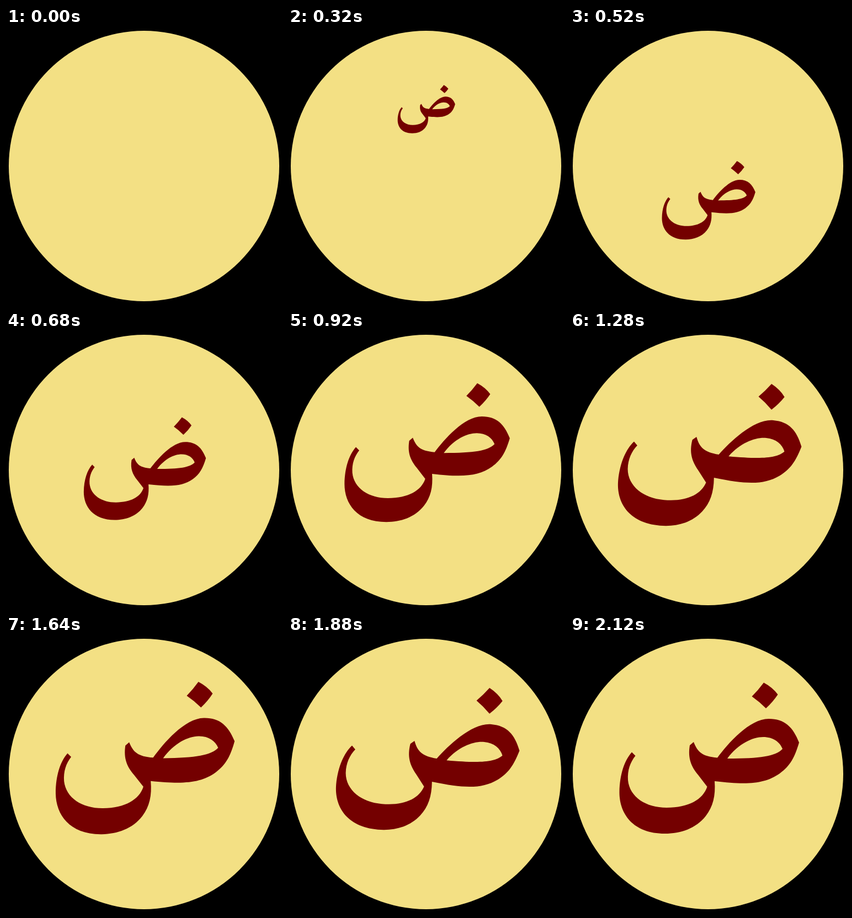
Animation, 500 px wide and 500 px high, one loop 2.8 s. Source, as an HTML page:

```html
<!DOCTYPE html>
<html lang="ar">
<head>
<meta charset="utf-8">
<title>Letter Dad</title>
<style>
html, body { margin: 0; width: 100%; height: 100%; overflow: hidden; background: #000; }
svg { display: block; width: 100%; height: 100%; }
</style>
</head>
<body>
<svg viewBox="0 0 500 500" role="img" aria-label="ض">
  <circle cx="250" cy="250" r="245" fill="#f3e084"/>
  <path id="letter" fill="#740000" fill-rule="evenodd" visibility="hidden" d="
    M351 84.5 Q367 93 376.5 106 Q368 119 355 131 Q343 119 329.5 109.5 Q341 98 351 84.5 Z
    M112 210.5 L118.5 217 C109 229 104 243 105 261 C108 292 138 311 175 311
    C215 311 241 296 248.5 273 L232 251.5 C220 237 213 222 217 198 L224 192
    C231 210 239 218 267 220.5 C286 195 325 150 360 150 C389 150 404 165 415 193
    C407 220 399 235 380 249 C353 268 322 270 262 263
    C264 290 259 309 246 326 C228 349 200 358 172 358
    C114 358 89.5 322 89.5 283 C90 250 99 225 112 210.5 Z
    M285 222 C305 195 331 183 350 183 C368 183 380 192 385 204.500 C372 218 345 222 285 222 Z"/>
</svg>
<script>
const LOOP = 2800, STEP = 40;
const letter = document.getElementById('letter');

const easeIn = u => u * u;
const sine = u => (1 - Math.cos(Math.PI * u)) / 2;
const quad = u => u < 0.5 ? 2 * u * u : 1 - 2 * (1 - u) ** 2;

// Each key is [time, value, easing towards that value].
function track(keys, t) {
  let [t0, v0] = keys[0];
  for (const [t1, v1, ease] of keys.slice(1)) {
    if (t < t1) return v0 + (v1 - v0) * ease(Math.max(0, (t - t0) / (t1 - t0)));
    [t0, v0] = [t1, v1];
  }
  return v0;
}

const drop = [[0, -198], [520, 77, easeIn], [790, -16, sine], [1000, 0, sine]];
const wiggle = [[0, 0], [160, -6.7, quad], [320, 6.7, quad], [480, 0, quad]];

function draw(now) {
  const t = Math.floor(now % LOOP / STEP) * STEP;
  const scale = Math.min(1, t / 1000);
  const y = 250 + track(drop, t);
  const angle = track(wiggle, t - (t < 1600 ? 1000 : 1600));
  letter.setAttribute('visibility', t ? 'visible' : 'hidden');
  letter.setAttribute('transform',
    `translate(250 ${y}) rotate(${angle}) scale(${scale}) translate(-250 -250)`);
}

let start;
function frame(now) {
  start ??= now;
  draw(now - start);
  requestAnimationFrame(frame);
}
draw(0);
requestAnimationFrame(frame);
</script>
</body>
</html>
```
